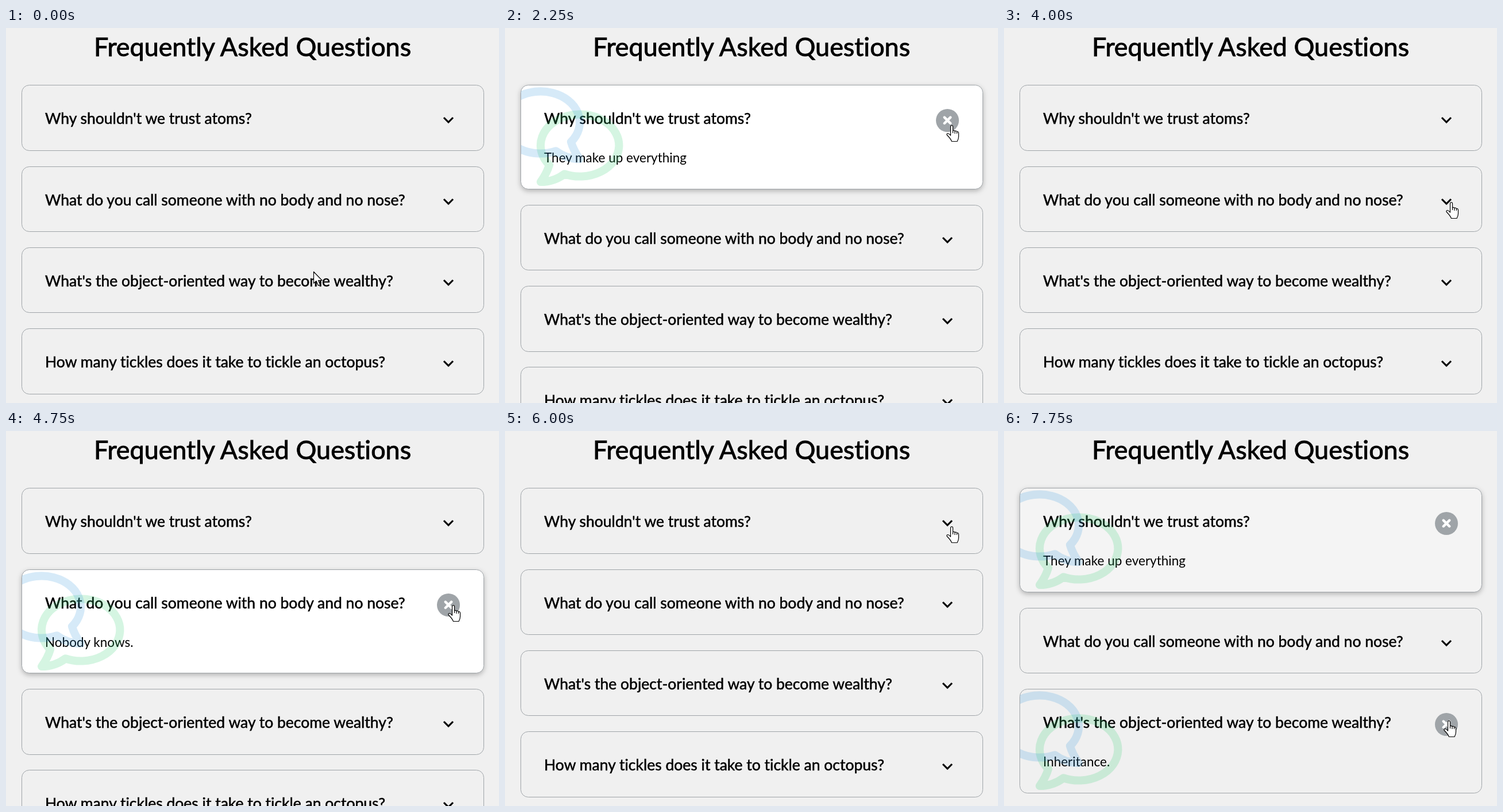
Recreate the animation shown at these times as an HTML page. Size 858 by 653 pixels, loop 8000 ms.

```html
<!DOCTYPE html>
<html lang="en">
<head>
<meta charset="utf-8">
<title>Frequently Asked Questions</title>
<style>
  html, body { margin: 0; width: 100%; height: 100%; overflow: hidden; background: #f0f0f0; }
  svg { display: block; }
  text { font-family: Lato, "Open Sans", sans-serif; font-variant-ligatures: none; }
  .title { font-size: 44.9px; text-anchor: middle; }
  .question { font-size: 26.5px; }
  .title, .question { stroke: #000; stroke-width: .02em; }
  .answer { font-size: 22.5px; }
  .card { stroke: #9fa4a8; }
  .chevron { fill: none; stroke: #000; stroke-width: 3.1; }
  .cross { stroke: #fff; stroke-width: 4.4; stroke-linecap: round; }
  .bubble { fill: none; stroke-width: 48; stroke-linejoin: round; opacity: .2; }
  .cursor { fill: #fff; stroke: #000; stroke-width: 1.2; stroke-linejoin: round; }
</style>
</head>
<body>
<svg id="stage" width="858" height="653" viewBox="0 0 858 653">
  <text class="title" x="429" y="49">Frequently Asked Questions</text>
  <g id="cards"></g>
  <path id="cursor" class="cursor"/>
</svg>
<script>
const LOOP = 8000;
const TOP = 99.2, CLOSED = 114.45, OPENED = 181.65, GAP = 26.9;
const GREY = '#f0f0f0', PALE = '#f4f4f4', WHITE = '#fff';

const faqs = [
  ["Why shouldn't we trust atoms?", 'They make up everything'],
  ['What do you call someone with no body and no nose?', 'Nobody knows.'],
  ["What's the object-oriented way to become wealthy?", 'Inheritance.'],
  ['How many tickles does it take to tickle an octopus?', 'Ten-tickles!'],
];

const card = (open, fill, shadow) => ({ open, fill, shadow });
const closing = card(false, '#f1f1f1', .2);
const opening = card(true, PALE, .8);
const opened = card(true, WHITE, 1);
const unlit = card(true, GREY, 0);

// [start time, state of each card by index]
const scenes = [
  [0, {}],
  [2000, { 0: opening }], [2250, { 0: opened }],
  [3000, { 0: closing }], [3250, {}],
  [4500, { 1: unlit }], [4750, { 1: opened }],
  [5250, { 1: closing }], [5500, {}],
  [6500, { 0: opening }], [6750, { 0: opened }],
  [7500, { 0: card(true, PALE, 1) }],
  [7750, { 0: card(true, PALE, 1), 2: unlit }],
];

const ARROW = 'M.5 .5V20.5L5 16.5L8.5 24.5L11.8 23L8.4 15.5H15Z';
const HAND = 'M7.5 18V3Q7.5 .5 9.5 .5T11.5 3V10Q13 8.5 15 10.5Q17 9.5 18.5 11.5Q21 11 21.5 13.5' +
  'V20Q21.5 24 19 28.5H9.5Q8 25 5.5 22L1 17Q.5 14.5 3 14.5Q5 15 7.5 18Z' +
  'M11.5 9V14M15 10.5V15M18.5 11.5V15';

// [start time, shape, x, y]
const moves = [
  [0, ARROW, 535, 424], [250, ARROW, 726, 161], [500, ARROW, 742, 198], [750, ARROW, 769, 181],
  [1000, HAND, 768, 174], [1250, HAND, 768, 169],
  [3500, HAND, 781, 306], [3750, HAND, 773, 313], [4000, HAND, 769, 303],
  [5500, ARROW, 773, 194], [5750, HAND, 773, 173], [6000, HAND, 768, 166],
  [6500, ARROW, 754, 309], [6750, ARROW, 745, 446], [7000, ARROW, 767, 489], [7250, HAND, 765, 504],
];

// Speech bubble on a 512-unit grid
const BUBBLE = 'M165 409A232 184 0 1 0 75 355C62 402 24 456 24 456C80 456 130 435 165 409Z';
const bubble = (colour, x, y, flip) =>
  `<path class="bubble" stroke="${colour}" d="${BUBBLE}"
    transform="translate(${x} ${y}) scale(${flip * .294} .294)"/>`;

const button = (open, y) => open
  ? `<circle cx="770" cy="${y + 62}" r="20" fill="#9fa4a8"/>
     <path class="cross" d="M764.8 ${y + 56.6}l10.4 10.4m0-10.4l-10.4 10.4"/>`
  : `<path class="chevron" d="M762 ${y + 57}l8 8l8-8"/>`;

function drawCard([question, answer], { open, fill, shadow }, top) {
  const y = Math.round(top);
  const height = Math.round(top + (open ? OPENED : CLOSED)) - y;
  const filter = shadow ? `style="filter:drop-shadow(0 3px 4px rgba(0,0,0,${.26 * shadow}))"` : '';
  const extra = open
    ? `<text class="answer" x="68" y="${y + 135}">${answer}</text>
       <svg x="28" y="${y + 1}" width="803" height="${height - 2}">
         ${bubble('#2ecc71', 27, 34, 1)}${bubble('#3498db', 109, -6, -1)}
       </svg>`
    : '';
  return `<rect class="card" x="27.5" y="${y + .5}" width="804" height="${height - 1}" rx="13"
      fill="${fill}" ${filter}/>
    <text class="question" x="68" y="${y + 67.5}">${question}</text>${extra}${button(open, y)}`;
}

function drawScene(states) {
  let top = TOP;
  return faqs.map((faq, i) => {
    const state = states[i] || card(false, GREY, 0);
    const markup = drawCard(faq, state, top);
    top += (state.open ? OPENED : CLOSED) + GAP;
    return markup;
  }).join('');
}

const current = (track, time) => track.findLast(([start]) => start <= time);
const cards = document.getElementById('cards');
const cursor = document.getElementById('cursor');
let shown;

function frame() {
  const time = performance.now() % LOOP;
  const scene = current(scenes, time);
  if (scene !== shown) {
    cards.innerHTML = drawScene(scene[1]);
    shown = scene;
  }
  const [, shape, x, y] = current(moves, time);
  cursor.setAttribute('d', shape);
  cursor.setAttribute('transform', `translate(${x} ${y})`);
  requestAnimationFrame(frame);
}
frame();
</script>
</body>
</html>
```
